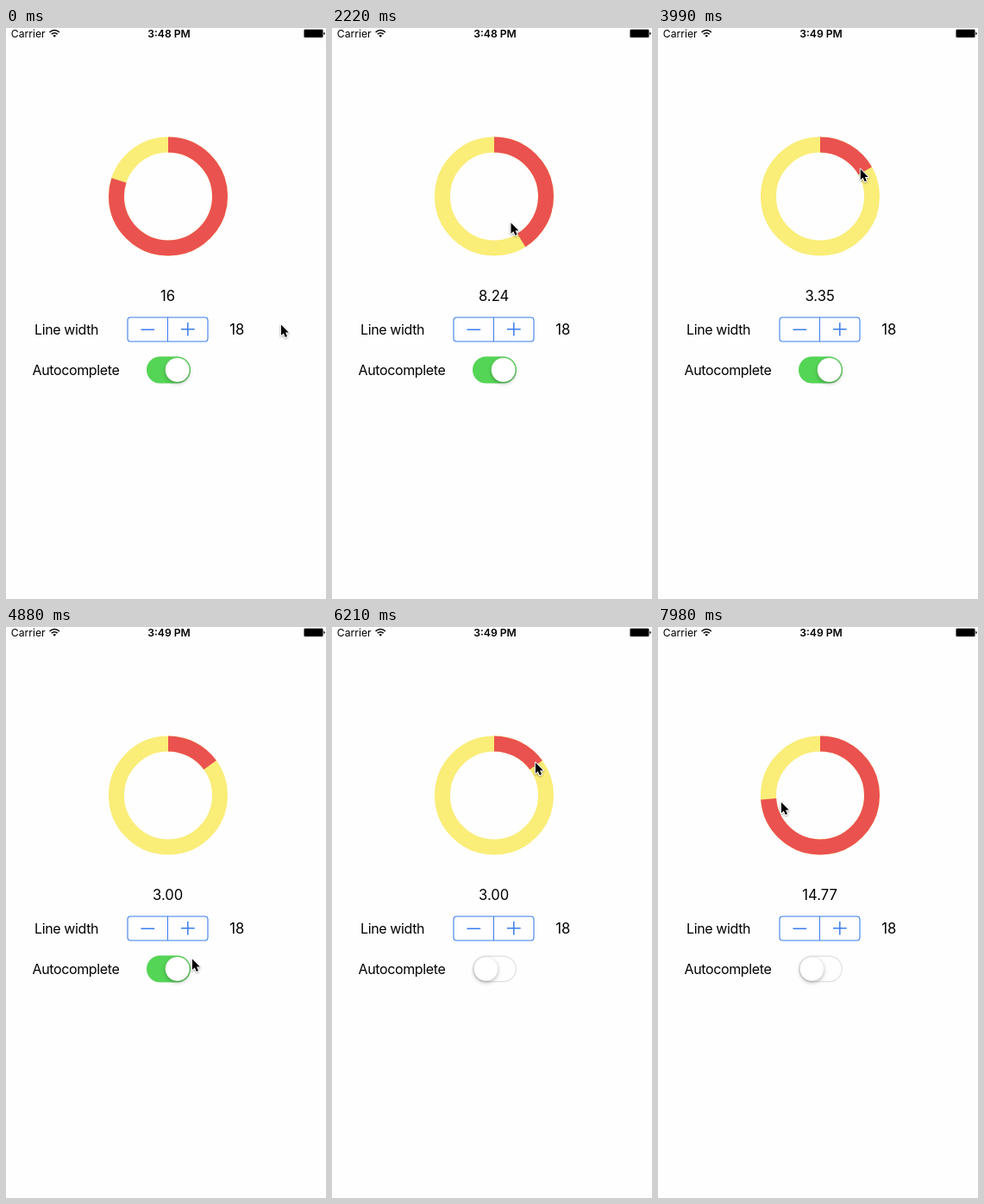
An HTML page for the animation above (8 s loop, 371x663 px).

```html
<!DOCTYPE html>
<html lang="en">
<head>
<meta charset="utf-8">
<title>Circular slider</title>
<style>
  html, body { margin: 0; width: 100%; height: 100%; overflow: hidden; background: #fefefe; }
  svg { display: block; width: 371px; height: 663px; }
  text { font-family: Inter, "Open Sans", sans-serif; font-size: 16px; fill: #000; }
  .name { letter-spacing: -.38px; }
  .num { font-size: 16.6px; text-anchor: middle; }
  .status { font-size: 12.2px; }
  .clock { font-weight: 600; text-anchor: middle; }
  .blue { fill: none; stroke: #3b7df0; }
  .knob { filter: drop-shadow(0 2.5px 2px rgba(0, 0, 0, .25)); }
  .arrow { filter: drop-shadow(0 1px 1px rgba(0, 0, 0, .35)); }
</style>
</head>
<body>
<svg viewBox="0 0 371 663">
  <text class="status" x="5.8" y="10.5">Carrier</text>
  <g fill="none" stroke="#000" stroke-width="1.5">
    <path d="M50.6 4.9a7.8 7.8 0 0 1 11.2 0M52.8 7.1a4.8 4.8 0 0 1 6.8 0"/>
    <path d="M56.2 10.8l-1.8-1.9a2.6 2.6 0 0 1 3.6 0z" fill="#000" stroke="none"/>
  </g>
  <text class="status clock" id="clock" x="189" y="10.5"></text>
  <rect x="345.5" y="1.8" width="22" height="9.2" rx="1.3" stroke="#777" stroke-width=".6"/>
  <path d="M368.4 4.8q1.4 .4 1.4 1.6t-1.4 1.6z"/>

  <g fill="none" stroke-width="18" transform="rotate(-90 188 195.5)">
    <circle cx="188" cy="195.5" r="60" stroke="#faed78"/>
    <circle id="arc" cx="188" cy="195.5" r="60" stroke="#ea524f" pathLength="20"/>
  </g>
  <text class="num" id="value" x="187.6" y="316.5"></text>

  <text class="name" x="33" y="355.5">Line width</text>
  <g class="blue">
    <rect x="141" y="336" width="93" height="28" rx="3.5" stroke-width="1.1"/>
    <path d="M187.5 336v28" stroke-width="1"/>
    <path d="M156.5 350.2h15.7M203 349.7h15.7M210.8 341.9v15.7" stroke-width="1.5"/>
  </g>
  <text class="num" x="267.8" y="356">18</text>

  <text class="name" x="30.6" y="402.5">Autocomplete</text>
  <rect x="163.7" y="382.2" width="49.6" height="29.6" rx="14.8" fill="#fefefe" stroke="#e4e4e4" stroke-width="1.4"/>
  <rect id="track" x="163" y="381.5" width="51" height="31" rx="15.5" fill="#55d556"/>
  <circle class="knob" id="knob" cx="198.7" cy="397" r="14" fill="#fff" stroke="#000" stroke-opacity=".12" stroke-width=".5"/>

  <g class="arrow" id="cursor">
    <path d="M.9 1.5V14L3.8 11.4 5.8 16 8 15.1 6 10.6H9.8Z" stroke="#fff" stroke-width="2" stroke-linejoin="round" paint-order="stroke"/>
  </g>
</svg>
<script>
  const LOOP = 8000, STEP = 147.8, CX = 188, CY = 195.5;
  const $ = id => document.getElementById(id);

  // Pointer legs, timed in steps. A leg with a value drags the ring along an arc.
  const legs = [
    { from: 1, to: 9, x: 127, y: 177 },
    { from: 9, to: 17, x: 238, y: 218, value: 6.38, bend: 1.187, dip: 31 },
    { from: 19, to: 23, x: 240, y: 204 },
    { from: 23, to: 28, x: 231, y: 158, value: 3.04 },
    { from: 29, to: 33, x: 215, y: 384 },
    { from: 33, to: 36, x: 199, y: 394 },
    { from: 38, to: 42, x: 235, y: 156 },
    { from: 42, to: 48, x: 226, y: 231, value: 7.36, bend: 4 },
    { from: 49, to: 54, x: 142, y: 202, value: 14.77, bend: 1.4 }
  ];

  const clamp = k => Math.min(1, Math.max(0, k));
  const mix = (a, b, k) => a + (b - a) * k;
  const smooth = k => k * k * (3 - 2 * k);
  const ease = (k, bend) => bend ? 1 - (1 - k) ** bend : smooth(k);
  const radius = p => Math.hypot(p.x - CX, p.y - CY);
  const angle = p => (Math.atan2(p.x - CX, CY - p.y) + 2 * Math.PI) % (2 * Math.PI);

  function orbit(a, b, k, dip) {
    const t = mix(angle(a), angle(b), k), r = mix(radius(a), radius(b), k) - dip;
    return { x: CX + r * Math.sin(t), y: CY - r * Math.cos(t) };
  }

  function pose(n) {
    let p = { x: 318, y: 343 }, value = 16;
    for (const leg of legs) {
      if (n <= leg.from) break;
      const t = clamp((n - leg.from) / (leg.to - leg.from)), k = ease(t, leg.bend);
      if (leg.value) {
        p = orbit(p, leg, k, (leg.dip || 0) * Math.sin(Math.PI * t));
        value = mix(value, leg.value, k);
      } else {
        p = { x: mix(p.x, leg.x, k), y: mix(p.y, leg.y, k) };
        value = Math.round(value); // released: snap to a whole number
      }
    }
    return { ...p, value };
  }

  function draw() {
    const n = Math.floor((performance.now() % LOOP + 4) / STEP);
    const { x, y, value } = pose(n), off = smooth(clamp((n - 35) / 3));
    $('cursor').setAttribute('transform', `translate(${x} ${y})`);
    $('arc').setAttribute('stroke-dasharray', `${value} 20`);
    $('value').textContent = value === 16 ? '16' : value.toFixed(2);
    $('clock').textContent = n < 21 ? '3:48 PM' : '3:49 PM';
    $('knob').setAttribute('cx', 198.7 - 20.2 * off);
    $('track').setAttribute('opacity', 1 - off);
    requestAnimationFrame(draw);
  }
  draw();
</script>
</body>
</html>
```
